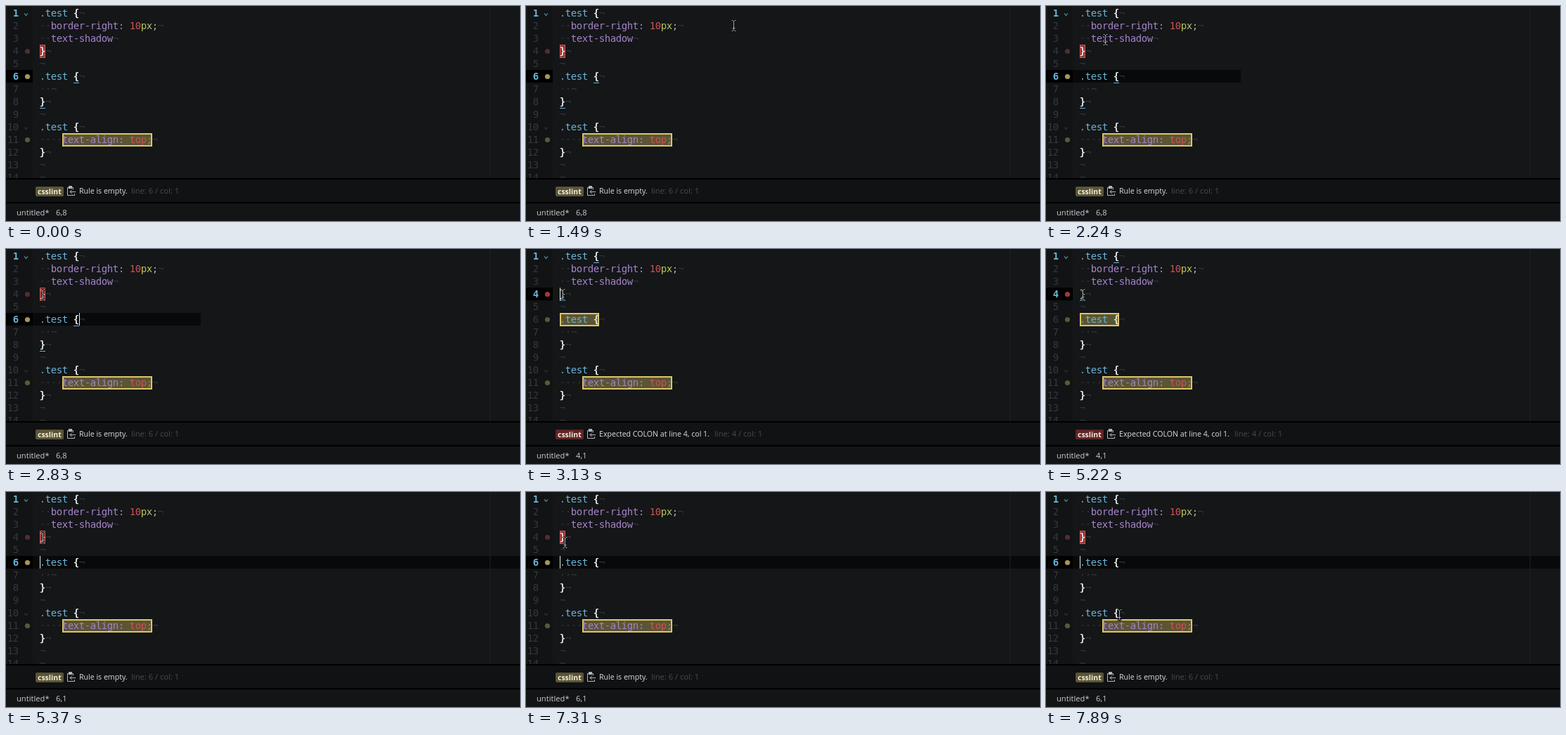
An HTML page with a canvas that plays this animation: 731 px wide and 306 px high, repeating every 8000 ms.

```html
<!DOCTYPE html>
<html lang="en">
<head>
<meta charset="utf-8">
<title>Linter in a code editor</title>
<style>
  html, body { margin: 0; width: 100%; height: 100%; overflow: hidden; background: #141618; }
  canvas { display: block; }
</style>
</head>
<body>
<canvas id="stage" width="731" height="306"></canvas>
<script>
const ctx = document.getElementById('stage').getContext('2d');
const LOOP = 8000, BLINK = 412;
const WIDTH = 731, EDITOR_BOTTOM = 245, CELL = 8, ROW = 18, CODE_X = 48, GUTTER = 38;
const MONO = '14px "DejaVu Sans Mono", "Noto Sans Mono", monospace';
const UI = '"Open Sans", "Noto Sans", sans-serif';

const BLUE = '#69b4d6', PURPLE = '#a583c9', RED = '#cc5350', GREEN = '#b3c85c';
const WHITE = '#e3e5e6', FAINT = '#303438', YELLOW = '#dcc566', OLIVE = '#5b5535';

const selector = [['.', '#6e9fb8'], ['test', BLUE], [' '], ['{', WHITE, 700]];
const brace = [['}', WHITE, 700]];
const dots = n => ['·'.repeat(n), FAINT];
const lines = [
  selector,
  [dots(2), ['border-right:', PURPLE], [' '], ['10', RED], ['px', GREEN], [';', '#a9adb0']],
  [dots(2), ['text-shadow', PURPLE]],
  brace,
  [],
  selector,
  [dots(2)],
  brace,
  [],
  selector,
  [dots(4), ['text-align:', PURPLE], [' '], ['top', RED], [';', '#b0803f']],
  brace,
  [],
  []
];

// Each state holds from its start time on; the caret blinks from blinkFrom.
const emptyRule = { row: 6, badge: OLIVE, message: 'Rule is empty.', placeX: 178 };
const afterBrace = { ...emptyRule, col: 8, blinkFrom: 900, matched: [[6, 7], [8, 1]] };
const states = [
  { at: 0, ...afterBrace, strip: 0 },
  { at: 1940, ...afterBrace, strip: 277 },
  { at: 3130, blinkFrom: 3130, row: 4, col: 1, badge: '#602527', placeX: 268,
    message: 'Expected COLON at line 4, col 1.', matched: [[1, 7], [4, 1]], strip: 0 },
  { at: 5370, blinkFrom: 5370, ...emptyRule, col: 1, matched: [], strip: WIDTH }
];

const easeOut = power => p => 1 - (1 - p) ** power;
const smooth = p => p * p * (3 - 2 * p);
const sweeps = [
  { start: 1200, end: 1640, from: [444, 32], to: [247, 26], ease: [easeOut(1.3), easeOut(1)] },
  { start: 1790, end: 2830, from: [247, 26], to: [52, 65], ease: [easeOut(3.2), easeOut(1.5)] },
  { start: 7210, end: 7890, from: [52, 65], to: [104, 175], ease: [smooth, smooth] }
];

const rowTop = n => 1 + ROW * (n - 1);
const colX = n => CODE_X + CELL * (n - 1);

function fill(color, x, y, w, h) {
  ctx.fillStyle = color;
  ctx.fillRect(x, y, w, h);
}

// One character per cell, centred in it.
function code(text, x, row, color, weight = 400) {
  ctx.font = `${weight} ${MONO}`;
  ctx.fillStyle = color;
  ctx.textAlign = 'center';
  [...text].forEach((char, i) => ctx.fillText(char, x + (i + 0.5) * CELL, rowTop(row) + 14));
}

function label(text, x, y, color, size = 11.2, weight = 400) {
  ctx.font = `${weight} ${size}px ${UI}`;
  ctx.fillStyle = color;
  ctx.textAlign = 'left';
  ctx.fillText(text, x, y);
}

function path(color, width, ...runs) {
  ctx.strokeStyle = color;
  ctx.lineWidth = width;
  ctx.beginPath();
  for (const run of runs) run.forEach(([x, y], i) => i ? ctx.lineTo(x, y) : ctx.moveTo(x, y));
  ctx.stroke();
}

function marker(row, col, length, border, inside) {
  const x = colX(col), y = rowTop(row), edge = length > 1 ? 2 : 1;
  fill(border, x, y, length * CELL, ROW + 1);
  fill(inside, x + edge, y + edge, length * CELL - 2 * edge, ROW + 1 - 2 * edge);
}

function dot(row, color) {
  ctx.fillStyle = color;
  ctx.beginPath();
  ctx.arc(30.5, rowTop(row) + 9.5, 3.6, 0, 7);
  ctx.fill();
}

function chevron(row, color) {
  const y = rowTop(row) + 9.5;
  path(color, 1.2, [[26, y], [28.5, y + 3], [31, y]]);
}

function gutter({ row, strip }) {
  fill('#111315', 2, 0, GUTTER - 2, EDITOR_BOTTOM);
  if (strip) fill('#08090a', GUTTER, rowTop(row), strip - GUTTER, ROW);
  fill('#000', 0, rowTop(row), GUTTER, ROW);
  lines.forEach((_, i) => {
    const n = i + 1, lit = n === row || n === 1;
    code(String(n).padStart(2), 2, n, lit ? BLUE : '#34393d', lit ? 700 : 400);
  });
  chevron(1, '#4d8199');
  chevron(10, '#2b2f32');
  dot(4, row === 4 ? '#9c3b3c' : '#572b2e');
  dot(6, row === 6 ? '#a6965a' : '#5b5738');
  dot(11, '#5b5738');
}

function editor(state, caretOn) {
  ctx.save();
  ctx.beginPath();
  ctx.rect(0, 0, WIDTH, EDITOR_BOTTOM);
  ctx.clip();
  fill('#141618', 0, 0, WIDTH, EDITOR_BOTTOM);
  gutter(state);
  fill('#1d2022', 688, 0, 1, EDITOR_BOTTOM);
  marker(11, 5, 16, YELLOW, OLIVE);
  if (state.row === 4) marker(6, 1, 7, YELLOW, OLIVE);
  else marker(4, 1, 1, '#d9534f', '#8c3233');

  lines.forEach((tokens, i) => {
    let x = CODE_X;
    for (const [text, color, weight] of tokens) {
      code(text, x, i + 1, color, weight);
      x += text.length * CELL;
    }
    code('¬', x, i + 1, FAINT);
  });
  for (const [row, col] of state.matched) fill(BLUE, colX(col), rowTop(row) + ROW, CELL, 1);
  if (caretOn) fill('#e8eaeb', colX(state.col), rowTop(state.row), 1, ROW);
  ctx.restore();
}

function clipboard(x, y) {
  const color = '#b4b7ba';
  ctx.save();
  ctx.translate(x, y);
  path(color, 1, [[8.5, 5], [8.5, 2.5], [0.5, 2.5], [0.5, 13.5], [10.5, 13.5], [10.5, 11]],
    [[12, 8.5], [4, 8.5]], [[7, 5.5], [4, 8.5], [7, 11.5]]);
  fill(color, 2, 0, 5, 4);
  ctx.restore();
}

function panels(state) {
  fill('#111214', 0, EDITOR_BOTTOM, WIDTH, 34);
  fill('#121416', 0, 280, WIDTH, 26);
  fill('#000', 0, EDITOR_BOTTOM, WIDTH, 2);
  fill('#000', 0, 279, WIDTH, 2);
  ctx.fillStyle = state.badge;
  ctx.beginPath();
  ctx.roundRect(42, 257, 40, 14, 2);
  ctx.fill();
  label('csslint', 45, 267.5, '#f2eede', 10.5, 700);
  clipboard(87, 256);
  label(state.message, 104, 267, '#dcdee0', 10.6, 500);
  label(`line: ${state.row} / col: 1`, state.placeX, 267, '#484b4e');
  label('untitled*', 15, 298, '#cacdd0');
  label(`${state.row},${state.col}`, 71, 298, '#cacdd0');
}

function pointer({ start, end, from, to, ease }, t) {
  const p = Math.min(1, (t - start) / (end - start));
  const [x, y] = from.map((a, i) => Math.round(a + (to[i] - a) * ease[i](p)));
  const cx = x + 0.5;
  const serif = side => [-3, -1.5, 0, 1.5, 3].map(dx => [cx + dx, y + side * (dx ? 7.5 : 6)]);
  const beam = [serif(-1), serif(1), [[cx, y - 6], [cx, y + 6]], [[cx - 2, y + 3.5], [cx + 2, y + 3.5]]];
  path('#0c0d0e', 2.6, ...beam);
  path('#a9abad', 1, ...beam);
}

function draw(t) {
  const state = states.findLast(s => s.at <= t);
  const caretOn = t >= state.blinkFrom && Math.floor((t - state.blinkFrom) / BLINK) % 2 === 0;
  const sweep = sweeps.findLast(s => s.start <= t);
  editor(state, caretOn);
  panels(state);
  if (sweep) pointer(sweep, t);
}

const begin = performance.now();
function frame() {
  draw((performance.now() - begin) % LOOP);
  requestAnimationFrame(frame);
}
frame();
</script>
</body>
</html>
```
